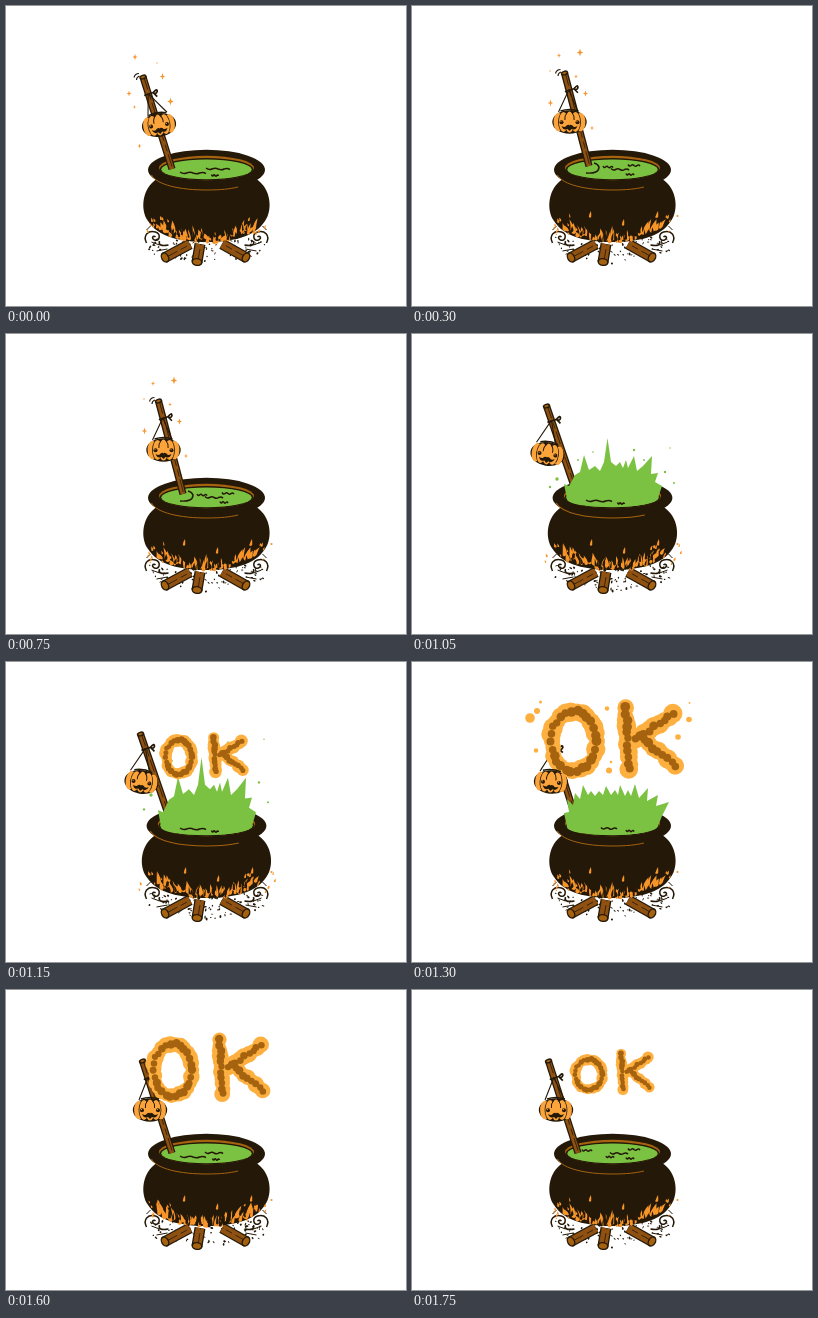
Recreate the animation shown at these times as an HTML page with a canvas. Size 400 px wide and 300 px high, loop 1.9 s.

```html
<!DOCTYPE html>
<html lang="en">
<head>
<meta charset="utf-8">
<title>Cauldron</title>
<style>
html, body { margin: 0; width: 100%; height: 100%; overflow: hidden; background: #fff; }
canvas { display: block; width: 400px; height: 300px; }
</style>
</head>
<body>
<canvas id="stage"></canvas>
<script>
const canvas = document.getElementById('stage');
const ctx = canvas.getContext('2d');
const ratio = window.devicePixelRatio || 1;
canvas.width = 400 * ratio;
canvas.height = 300 * ratio;

const DARK = '#241908', GREEN = '#7cc242', ORANGE = '#f7942a', PUFF = '#fdb040',
      BROWN = '#a5620f', WOOD = '#8f5112', PUMPKIN = '#fba43c';
const LOOP = 1900;

function seeded(seed) {
  let s = seed * 7919 + 17;
  return (a = 0, b = 1) => {
    s = (s * 16807) % 2147483647;
    return a + (b - a) * s / 2147483647;
  };
}

function ellipse(x, y, rx, ry, fill, tilt = 0) {
  ctx.beginPath();
  ctx.ellipse(x, y, rx, ry, tilt, 0, 7);
  ctx.fillStyle = fill;
  ctx.fill();
}
const dot = (x, y, r, fill) => ellipse(x, y, r, r, fill);

function line(d, color, width) {
  ctx.strokeStyle = color;
  ctx.lineWidth = width;
  ctx.stroke(new Path2D(d));
}

function shape(d, color) {
  ctx.fillStyle = color;
  ctx.fill(new Path2D(d));
}

function star([x, y, r]) {
  const q = r * 0.22;
  shape(`M${x} ${y - r}L${x + q} ${y - q}L${x + r * .8} ${y}L${x + q} ${y + q}L${x} ${y + r}` +
        `L${x - q} ${y + q}L${x - r * .8} ${y}L${x - q} ${y - q}Z`, ORANGE);
}

// Outlined bar with grain, used for the stick and the logs
function bar(x1, y1, x2, y2, w) {
  const d = `M${x1} ${y1}L${x2} ${y2}`;
  line(d, DARK, w);
  line(d, WOOD, w - 2.6);
  ctx.save();
  ctx.setLineDash([13, 4, 7, 3]);
  ctx.translate(0.8, 0);
  line(d, DARK, 0.8);
  ctx.restore();
}

function log(x1, y1, x2, y2) {
  bar(x1, y1, x2, y2, 11);
  const tilt = Math.atan2(y2 - y1, x2 - x1);
  ellipse(x1, y1, 4, 5.6, DARK, tilt);
  ellipse(x1, y1, 2.7, 4.1, BROWN, tilt);
}

function tongue(x, y, h, w, lean, color) {
  shape(`M${x - w} ${y}Q${x - w} ${y - h * .5} ${x + lean} ${y - h}` +
        `Q${x + w * 1.2} ${y - h * .4} ${x + w} ${y}Q${x} ${y + w * 1.3} ${x - w} ${y}Z`, color);
}

const potBottom = x => 234 - 17 * ((x - 200.5) / 58) ** 2;

function drawFire(kind) {
  const rnd = seeded(kind + 5);
  for (let i = 0; i < 42; i++) {
    const x = 152 + i * 97 / 41 + rnd(-1.5, 1.5);
    tongue(x, potBottom(x) + rnd(-3, 3), rnd(4, 12), rnd(1, 2.4), (x - 200) * .06 + rnd(-2, 2), ORANGE);
  }
  for (let i = 0; i < 30; i++) {
    const x = rnd(160, 241);
    tongue(x, potBottom(x) + rnd(-4, 3), rnd(4, 9), rnd(.7, 1.5), rnd(-2, 2), DARK);
  }
  for (let i = 0; i < 22; i++) {
    const side = i % 2 ? 1 : -1;
    const x = 200.5 + side * rnd(36, kind === 3 ? 72 : 59);
    tongue(x, rnd(211, 231), rnd(1.5, 4), rnd(.5, 1.1), side, ORANGE);
  }
  if (kind) {
    dot(265.5, 210, 1.1, ORANGE);
    [178, 211, 245].forEach((x, i) => tongue(x + kind % 2, 211 + i % 2 * 8, 6, 1.2, 1, ORANGE));
  }
}

function drawHearth(kind) {
  const rnd = seeded(kind + 40);
  for (let i = 0; i < 85; i++) {
    const x = rnd(143, 259), spread = Math.abs(x - 200) / 60;
    ellipse(x, rnd(230, 259 - spread * 12), rnd(.5, 1.6), rnd(.4, 1), DARK, rnd(0, 3));
  }
  for (const side of [-1, 1]) {
    ctx.save();
    ctx.translate(200.5, 0);
    ctx.scale(side, 1);
    line('M38 239Q49 241 47 235M60 237C64 229 58 224 51 226C45 228 47 236 52 234C56 232 53 229 51 231', DARK, 1.5);
    line('M39 243l11 2M47 239l8 -3M60 224l-4 -4', DARK, 1);
    ctx.restore();
  }
  log(159, 251.5, 184, 238);
  log(240, 251.5, 216, 238);
  log(191, 256, 194, 238);
}

function drawPot(scene) {
  ctx.save();
  if (scene.swell) {
    ctx.translate(200.5, 195);
    ctx.scale(1.024, 1);
    ctx.translate(-200.5, -195);
  }
  shape('M151 173C136 182 134 204 142 215C152 231 175 236 200.5 236C226 236 249 231 259 215C267 204 265 182 250 173Z', DARK);
  ellipse(200.5, 163.8, 58.5, 20, DARK);
  ellipse(200.5, 162, 47.5, 12.2, BROWN);
  ellipse(200.5, 163.2, 46.8, 11.1, DARK);
  ellipse(200.5, 163.4, 45.2, 9.8, GREEN);
  line('M145.5 169C151 179 174 184 201 184C214 184 224 183 232 181', BROWN, 1);
  ctx.restore();
}

// Ripples: [x, y, half width]
function ripple([x, y, w]) {
  line(`M${x - w} ${y - 1}q${w * .25} 2.4 ${w * .5} 1q${w * .3} -1.4 ${w * .5} 0` +
       `q${w * .3} 1.5 ${w * .5} 0q${w * .3} -1.2 ${w * .5} .6`, DARK, 1.5);
}

function drawStick({ top: [x, y], base: [bx, by], head: [px, py, tilt], shake }) {
  bar(x, y, bx, by, 7.2);
  ellipse(x, y, 3.8, 2.4, DARK, -.3);
  ellipse(x, y, 2.2, 1.1, BROWN, -.3);
  const k = .18, kx = x + (bx - x) * k, ky = y + (by - y) * k;
  const dy = 11 * Math.sin(tilt);
  line(`M${kx} ${ky}L${px - 11} ${py - 10 - dy}M${kx} ${ky}L${px + 8} ${py - 11 + dy}`, DARK, 1.1);
  line(`M${kx - 4} ${ky + 2}L${kx + 5} ${ky - 1}q4 -5 4 -1q-1 3 -4 1l4 4`, DARK, 1.7);
  if (shake) line(`M${x - 9} ${y + .5}q1 -4 5 -4M${x - 6.5} ${y + 3}q0 -3 3 -4`, DARK, 1.1);
}

function drawPumpkin([x, y, tilt]) {
  ctx.save();
  ctx.translate(x, y);
  ctx.rotate(tilt);
  ellipse(0, 0, 17.2, 11.8, DARK);
  for (const side of [-1, 1]) {
    ellipse(side * 11, 0, 4.9, 9.3, PUMPKIN);
    ellipse(side * 6, 0, 5.4, 10.2, DARK);
    ellipse(side * 6, 0, 4.6, 10, PUMPKIN);
  }
  ellipse(0, 0, 4.8, 10.5, PUMPKIN);
  line('M-2 -10Q-5.5 -6 -4.6 -2M2 -10Q5.5 -6 4.6 -2', DARK, 1);
  line('M-9 -11Q0 -14 9 -11', DARK, 1.5);
  for (const side of [-1, 1]) {
    dot(side * 8, .3, 2, DARK);
    dot(side * 8 - .5, -.4, .6, PUMPKIN);
  }
  shape('M-8 4Q-4 6 -3 3.5Q0 2 0 4Q0 2 3 3.5Q4 6 8 4Q6 9 2 7L0 9L-2 7Q-6 9 -8 4Z', DARK);
  ctx.restore();
}

const burst = [152,150, 157,152, 163,141, 168,138, 172,121, 177,136, 183,132, 188,137, 192,128, 195.5,104,
  199,128, 204,132, 208,128, 211,134, 214,126, 216,134, 222,122, 225,137, 231,132, 240,122, 239,140,
  246,139, 243,148, 250,152];
const grass = [152,151, 157,150, 155,137, 161,143, 163,131, 168,137, 171,123, 176,133, 179,129, 183,134,
  187,129, 191,133, 194,124, 199,133, 203,128, 206,133, 208,123, 213,134, 216,128, 219,134, 223,122,
  227,136, 236,126, 235,139, 246,133, 244,144, 257,140, 250,154];

function drawSplash(points, height) {
  let d = 'M155 165';
  for (let i = 0; i < points.length; i += 2)
    d += `L${points[i]} ${163 - (163 - points[i + 1]) * height}`;
  shape(d + 'L246 164C245 169 226 173 200 173C174 173 155 170 155 165Z', GREEN);
}

function drawDrops(height) {
  const drops = [[145,145,1.7], [138,153,1.2], [222,116,1.2], [253,138,1.2], [258,114,.7],
    [181,118,.8], [166,126,.9], [262,149,1], [232,126,.9]];
  drops.forEach(([x, y, r]) => dot(x, 160 - (160 - y) * height, r, GREEN));
}

// Each letter is a set of points along its strokes, in a unit box
function strokePoints(x1, y1, x2, y2, n) {
  return Array.from({ length: n }, (_, i) => [x1 + (x2 - x1) * i / (n - 1), y1 + (y2 - y1) * i / (n - 1)]);
}
const letterO = Array.from({ length: 26 }, (_, i) => {
  const a = i / 26 * Math.PI * 2;
  return [.5 + .5 * Math.cos(a), .5 + .5 * Math.sin(a)];
});
const letterK = [
  ...strokePoints(.02, 0, .1, 1, 11),
  ...strokePoints(.96, .1, .2, .52, 9),
  ...strokePoints(.32, .46, 1, .94, 9)
];

function drawLetters({ o, k, puff }) {
  const layers = [[PUFF, 1, .12], [BROWN, .5, .16]];
  for (const [color, size, jitter] of layers) {
    const rnd = seeded(size * 10 + 3);
    for (const [points, [left, top, right, bottom]] of [[letterO, o], [letterK, k]])
      for (const [u, v] of points)
        dot(left + (right - left) * u + rnd(-1, 1) * jitter * puff,
            top + (bottom - top) * v + rnd(-1, 1) * jitter * puff,
            puff * size * rnd(.82, 1.1), color);
  }
}

const crumbs = [[118,56,4.8], [125,49,3], [128.5,40,1.5], [124,88.5,2.2], [195,46.5,2.2], [197,108.5,3],
  [199,100,1.3], [277,57.5,2.8], [277.5,41,.9], [266,75,2.8]];

const stirLeft = {
  top: [137, 71], base: [166, 163], head: [153, 119, -.16], shake: true, fire: 0,
  stars: [[129,51,3.3], [151,57,1.3], [156.5,70.5,3.5], [123,87.5,3], [164.5,95.5,4], [128.5,101,2], [133.5,140,2.6]],
  ripples: [[187,167,13], [212,163,12], [209,169.5,3.5]]
};
const stirFront = {
  top: [146, 71], base: [175, 165], head: [157, 119, -.06], shake: true, fire: 1,
  stars: [[139,54,3], [160,52,2], [171,65,3.5], [136,84,2.5], [175,98,3], [140,101,1.5], [179,132,2.4]],
  ripples: [[190,168,10], [206,162,10], [221,166,5]]
};
const stirBack = {
  top: [152.5, 67], base: [177, 160], head: [157.5, 116, 0], shake: true, fire: 2, swirl: true,
  stars: [[147,49.5,2.6], [168,46.5,4], [138,65,1.4], [164,70.5,2.2], [173.5,87.5,3.2], [138.5,97,3.4], [180,122,2.4]],
  ripples: [[196,161,5], [208,163.5,9], [222,159.5,6], [218,168.5,4]]
};
const rest = { top: [136.5, 71], base: [166, 163], head: [144, 120, 0], fire: 2 };
const lifted = { ...rest, top: [134.5, 72], base: [162, 152], head: [135.5, 120, .16], fire: 3, swell: true,
  ripples: [[187,167,13], [209,169.5,3.5]] };
const bubbling = { ...rest, head: [139, 120, .08], ripples: [[197,166.5,8], [218,169,4]] };

const timeline = [
  [0, stirLeft], [150, stirFront], [300, stirBack],
  [450, stirLeft], [600, stirFront], [750, stirBack], [900, stirLeft],
  [1050, { ...lifted, splash: burst, height: 1, drops: 1 }],
  [1100, { ...lifted, splash: burst, height: 1.4, drops: 1.5 }],
  [1150, { ...lifted, splash: burst, height: 1.15, drops: 1.8,
    letters: { o: [160, 78, 186, 112], k: [207, 76, 237, 110], puff: 6 } }],
  [1200, { ...bubbling, splash: grass, height: 1.2,
    letters: { o: [147, 58, 185, 108], k: [211, 56, 256, 106], puff: 8 } }],
  [1250, { ...bubbling, splash: grass, height: 1.08, crumbs: .9,
    letters: { o: [139, 48, 185, 109], k: [212, 45, 263, 107], puff: 9.5 } }],
  [1300, { ...bubbling, splash: grass, height: 1, crumbs: 1,
    letters: { o: [139.5, 49.5, 184.5, 109], k: [212.5, 46, 263.5, 107.5], puff: 9 } }],
  [1450, { ...bubbling, head: [142, 120, .04], splash: grass, height: .55, crumbs: .96,
    letters: { o: [143, 50, 185.5, 108], k: [212.5, 47.5, 261, 105.5], puff: 8.5 } }],
  [1600, { ...rest, fire: 4, ripples: [[187,167,13], [208,163,9], [210,169.5,3.5]],
    letters: { o: [148, 54, 186, 106], k: [212.5, 50, 257, 104], puff: 7.7 } }],
  [1750, { ...rest, ripples: [[175,160.5,5], [207,163.5,9], [198,167,4], [222,159.5,6], [218,168.5,4]],
    letters: { o: [163.5, 69.5, 190.5, 99.5], k: [208.5, 64, 237.5, 99.5], puff: 5.3 } }]
];

function draw(scene) {
  ctx.setTransform(ratio, 0, 0, ratio, 0, 0);
  ctx.fillStyle = '#fff';
  ctx.fillRect(0, 0, 400, 300);
  ctx.lineJoin = 'round';
  drawHearth(scene.fire);
  drawPot(scene);
  drawFire(scene.fire);
  drawStick(scene);
  if (scene.splash) drawSplash(scene.splash, scene.height);
  if (scene.drops) drawDrops(scene.drops);
  scene.ripples.forEach(ripple);
  if (scene.swirl) line('M174 167Q187 168 187 161Q186 158 182 157', DARK, 1.5);
  if (scene.letters) drawLetters(scene.letters);
  if (scene.crumbs)
    crumbs.forEach(([x, y, r]) => dot(200 + (x - 200) * scene.crumbs, 78 + (y - 78) * scene.crumbs, r * scene.crumbs, PUFF));
  drawPumpkin(scene.head);
  (scene.stars || []).forEach(star);
}

const start = performance.now();
function tick() {
  const t = (performance.now() - start) % LOOP;
  draw(timeline.filter(([at]) => at <= t).pop()[1]);
  requestAnimationFrame(tick);
}
tick();
</script>
</body>
</html>
```
